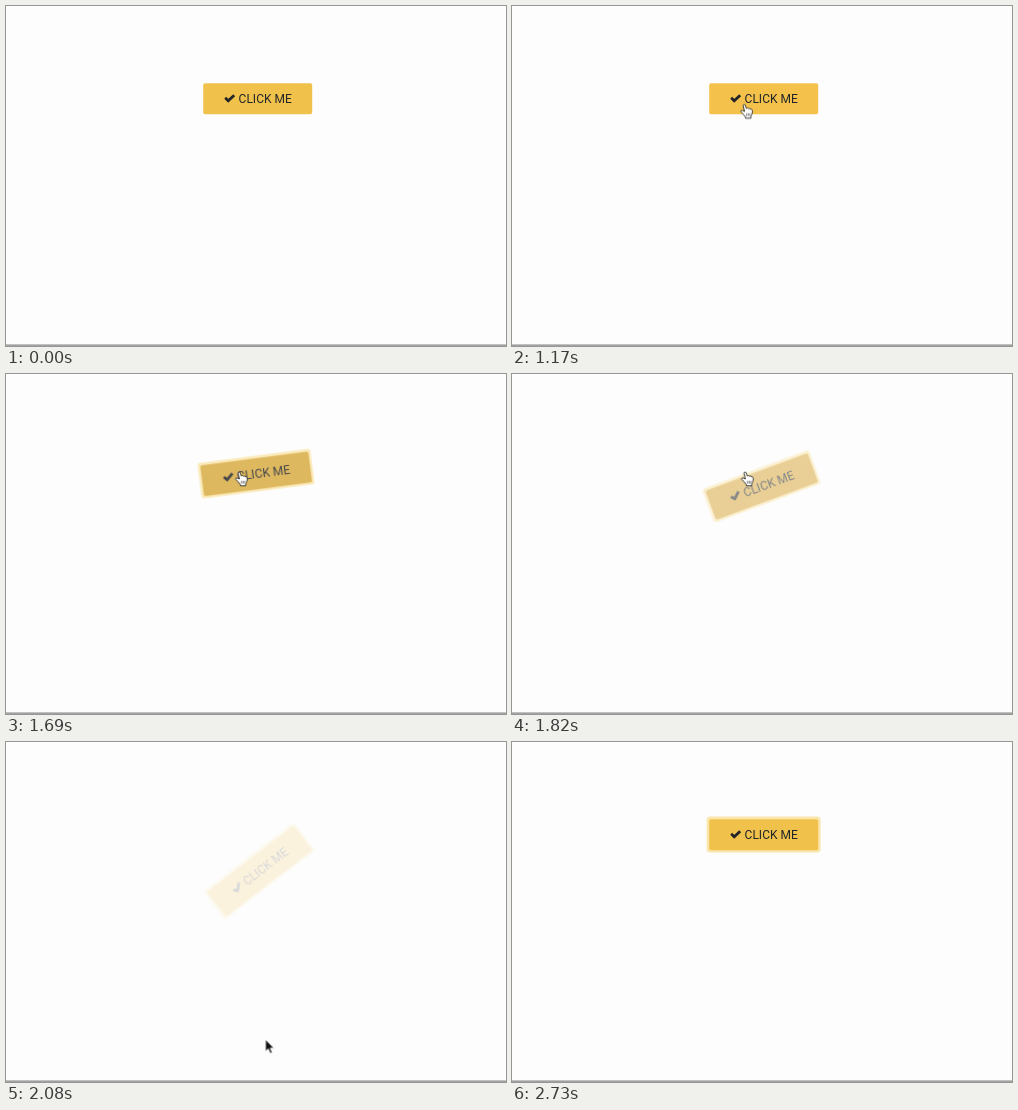
An HTML page for the animation above (2990 ms loop, 500x340 px).

```html
<!DOCTYPE html>
<html lang="en">
<head>
<meta charset="utf-8">
<title>Click me</title>
<style>
  html, body { margin: 0; width: 100%; height: 100%; overflow: hidden; background: #fdfdfd; }
  svg { display: block; width: 500px; height: 340px; }

  /* Everything advances in 130 ms ticks: 23 ticks per loop. */
  .button, .face, .ring, .hand, .arrow { animation: 2990ms step-end infinite; }

  .button { transform-origin: 306px 108px; animation-name: swing; }
  .face { fill: #f0c24c; animation-name: tint; }
  .ring { fill: #fae6ac; opacity: 0; animation-name: focus; }
  .label { font: 12px Roboto, Inter, sans-serif; fill: #212529; }
  .check { fill: none; stroke: #212529; stroke-width: 2.7; }

  .hand { fill: #fff; stroke: #2b2b2b; stroke-width: .9; stroke-linejoin: round; animation-name: point; }
  .arrow { fill: #111; stroke: #fff; stroke-width: .8; animation-name: leave; }

  /* Swings down around its lower right corner while fading */
  @keyframes swing {
    0%     { transform: rotate(0); opacity: 1; }
    56.52% { transform: rotate(-7.4deg); opacity: .84; }
    60.86% { transform: rotate(-20.3deg); opacity: .55; }
    65.21% { transform: rotate(-30.6deg); opacity: .32; }
    69.56% { transform: rotate(-37.6deg); opacity: .17; }
    73.91% { transform: rotate(-41.5deg); opacity: .08; }
    78.26% { transform: rotate(-43.9deg); opacity: .025; }
    82.6%  { transform: rotate(-45deg); opacity: 0; }
    91.3%, 100% { transform: rotate(0); opacity: 1; }
  }
  @keyframes tint {
    0%     { fill: #f0c24c; }
    30.43% { fill: #f4c24b; }
    52.17% { fill: #d8aa40; }
    65.21% { fill: #e8b545; }
    69.56% { fill: #f3b93c; }
    91.3%, 100% { fill: #f0c24c; }
  }
  @keyframes focus {
    0% { opacity: 0; }
    56.52%, 100% { opacity: 1; }
  }
  @keyframes point {
    0%     { transform: translate(220.8px, 101px); visibility: hidden; }
    30.43% { transform: translate(220.8px, 101px); visibility: visible; }
    34.78% { transform: translate(225.5px, 98.8px); visibility: visible; }
    39.13% { transform: translate(228px, 97.4px); visibility: visible; }
    43.47% { transform: translate(228.8px, 97px); visibility: visible; }
    65.21%, 100% { transform: translate(228.8px, 97px); visibility: hidden; }
  }
  @keyframes leave {
    0%     { transform: translate(243px, 180px); visibility: hidden; }
    65.21% { transform: translate(243px, 180px); visibility: visible; }
    69.56% { transform: translate(259.5px, 297.5px); visibility: visible; }
    73.91%, 100% { transform: translate(259.5px, 297.5px); visibility: hidden; }
  }
</style>
</head>
<body>
<svg viewBox="0 0 500 340">
  <rect y="338.6" width="500" height="1" fill="#666"/>

  <g class="button">
    <rect class="ring" x="194.6" y="74.6" width="114" height="36" rx="3.5"/>
    <rect class="face" x="197.2" y="77.2" width="109" height="31" rx="2"/>
    <path class="check" d="M219.2 91.8 222.2 94.8 228.2 89.2"/>
    <text class="label" x="232.6" y="96.8">CLICK ME</text>
  </g>

  <g class="hand">
    <path d="M4.6 8 3.2 2.6C2.8.8 4.9.3 5.4 2L6.4 5C7 4.2 8.3 4.4 8.6 5.3 9.3 4.7 10.4 5 10.7 5.9 11.8 5.5 12.5 6.3 12.4 7.5 12.4 9.8 12 11 11 12.6L10.9 14.8H5.6L5.3 13.2C4 11.5 2.2 9.9 1 8.4.3 7.4 1.6 6.4 2.8 7.2Z"/>
    <path d="M6.7 9.8v2.8M8.3 9.8v2.8M9.9 9.8v2.8" stroke-width=".6"/>
  </g>

  <path class="arrow" d="M0 0V12L2.8 9.4 4.8 14 6.8 13.1 4.8 8.7H8.6Z"/>
</svg>
</body>
</html>
```
